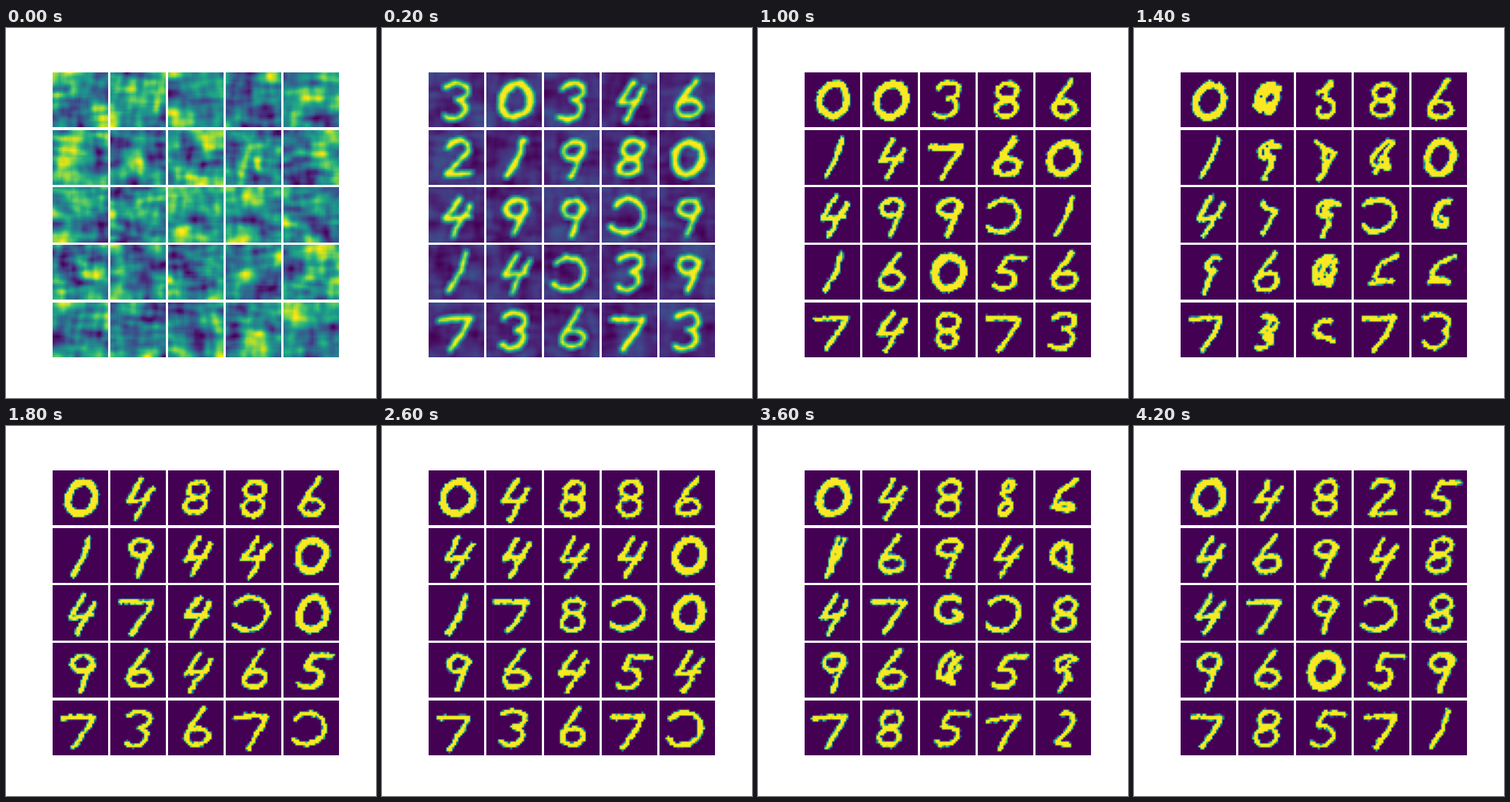
A matplotlib script that plays this animation: 500 px wide and 500 px high, repeating every 4400 ms.

```python
import numpy as np
import matplotlib.pyplot as plt
from matplotlib.animation import FuncAnimation

GRID, SIDE = 28, 75            # samples per tile, tile side in pixels
FRAMES, INTERVAL = 22, 200
KEYS = [3, 5, 9, 13, 16, 21]   # steps at which the shapes below are reached

# Shapes each tile passes through, one row of tiles per line.
HISTORY = """
300000 004444 338888 488882 666665
211414 149466 974499 864444 000008
444144 997777 994809 )))))) 910088
119999 466666 )04440 356555 965449
777777 343388 686655 777777 33))21
""".split()


def line(*xy):
    return np.reshape(xy, (-1, 2))


def arc(cx, cy, rx, ry, start, end):
    a = np.radians(np.linspace(start, end, 40))
    return np.stack([cx + rx * np.cos(a), cy + ry * np.sin(a)], 1)


def stroke(*parts, n=48):
    """Join the parts, slant them, scale to pixels and space the points evenly."""
    p = np.concatenate(parts)
    p = np.stack([39 + 33 * (p[:, 0] - 0.1 * p[:, 1]), 39 + 27 * p[:, 1]], 1)
    s = np.r_[0, np.cumsum(np.hypot(*np.diff(p, axis=0).T))]
    t = np.linspace(0, s[-1], n)
    return np.stack([np.interp(t, s, p[:, 0]), np.interp(t, s, p[:, 1])], 1)


GLYPHS = {
    "0": [stroke(arc(0, 0, 0.58, 0.8, -60, -420))],
    "1": [stroke(line(0.25, -0.9, 0.1, 0, -0.25, 0.95))],
    "2": [stroke(arc(-0.05, -0.45, 0.42, 0.45, -160, 50), line(-0.4, 0.8, 0.6, 0.72))],
    "3": [stroke(arc(-0.1, -0.45, 0.48, 0.42, -150, 80), arc(-0.1, 0.4, 0.48, 0.47, -80, 140))],
    "4": [stroke(line(0, -0.9, -0.45, 0.15, 0.4, 0.05)),
          stroke(line(0.5, -0.55, 0.2, 0.2, -0.1, 1))],
    "5": [stroke(line(0.7, -0.75, -0.05, -0.75, -0.3, -0.1), arc(-0.1, 0.37, 0.48, 0.46, -90, 140))],
    "6": [stroke(line(0.2, -1, -0.3, 0), arc(0.05, 0.4, 0.45, 0.4, 195, -165))],
    "7": [stroke(line(-0.8, -0.55, 0.45, -0.6, 0.2, 0.1, -0.2, 0.95))],
    "8": [stroke(arc(0, -0.45, 0.4, 0.4, 90, -270), arc(0, 0.4, 0.42, 0.42, -90, 270))],
    "9": [stroke(arc(0, -0.4, 0.42, 0.4, -20, -380), line(0.05, 0.95))],
    ")": [stroke(arc(-0.2, 0, 0.7, 0.8, -140, 140))],
}

centres = (np.arange(GRID) + 0.5) * SIDE / GRID
X, Y = np.meshgrid(centres, centres)


def noise(rng, rows, cols):
    """Box-filtered noise with unit spread."""
    a = rng.normal(size=(GRID + rows - 1, GRID + cols - 1))
    for n, axis in ((rows, 0), (cols, 1)):
        a = np.apply_along_axis(np.convolve, axis, a, np.ones(n), "valid")
    return a / a.std()


def soften(a):
    """3 x 3 box filter."""
    p = np.pad(a, 1, mode="edge")
    return sum(p[r:r + GRID, c:c + GRID] for r in range(3) for c in range(3)) / 9


def texture(index):
    """Broad patches crossed by fine streaks, scaled to 0..1."""
    rng = np.random.default_rng(40 + index)
    a = noise(rng, 9, 11) + 0.5 * noise(rng, 2, 9) + 0.35 * noise(rng, 8, 2)
    a = soften(a)
    return (a - a.min()) / np.ptp(a)


def distance(p):
    """Distance from every sample to a polyline."""
    a, d = p[:-1], np.diff(p, axis=0)
    dx, dy = X[..., None] - a[:, 0], Y[..., None] - a[:, 1]
    t = np.clip((dx * d[:, 0] + dy * d[:, 1]) / ((d ** 2).sum(1) + 1e-9), 0, 1)
    return np.hypot(dx - t * d[:, 0], dy - t * d[:, 1]).min(-1)


def wobble(rng, n=48):
    """Slow random drift along a stroke."""
    knots = rng.normal(size=(5, 2))
    t = np.linspace(0, 4, n)
    return np.stack([np.interp(t, range(5), k) for k in knots.T], 1)


def width(shape):
    return 10 if shape == "0" else 7


def ink(index, step):
    """Rough strokes, eased from one shape of the tile's history to the next."""
    i = int(np.clip(np.searchsorted(KEYS, step, "right") - 1, 0, len(KEYS) - 2))
    u = np.clip((step - KEYS[i]) / (KEYS[i + 1] - KEYS[i]), 0, 1)
    u = u * u * (3 - 2 * u)
    old, new = HISTORY[index][i:i + 2]
    a, b = GLYPHS[old], GLYPHS[new]
    rng = np.random.default_rng(100 * step + index)
    near = np.full(X.shape, 99.0)
    for k in range(max(len(a), len(b))):
        start, end = a[min(k, len(a) - 1)], b[min(k, len(b) - 1)]
        near = np.minimum(near, distance(start + (end - start) * u + wobble(rng)))
    radius = (width(old) * (1 - u) + width(new) * u) / 2
    edge = radius + 0.7 * noise(rng, 2, 2) - near
    return np.clip(edge + 0.5, 0, 1)


def picture(index, step):
    if step == 0:
        return texture(index)
    if step == 1:
        return np.clip(soften(ink(index, step)) + 0.25 * texture(index), 0, 1)
    return ink(index, step)


fig, axes = plt.subplots(5, 5, figsize=(5, 5), dpi=100,
                         gridspec_kw=dict(wspace=0.05, hspace=0.05))
images = []
for index, ax in enumerate(axes.flat):
    ax.axis("off")
    images.append(ax.imshow(texture(index), cmap="viridis", vmin=0, vmax=1, aspect="auto"))


def update(step):
    for index, image in enumerate(images):
        image.set_data(picture(index, step))
    return images


anim = FuncAnimation(fig, update, frames=FRAMES, interval=INTERVAL, repeat=True, repeat_delay=0)
plt.show()
```
